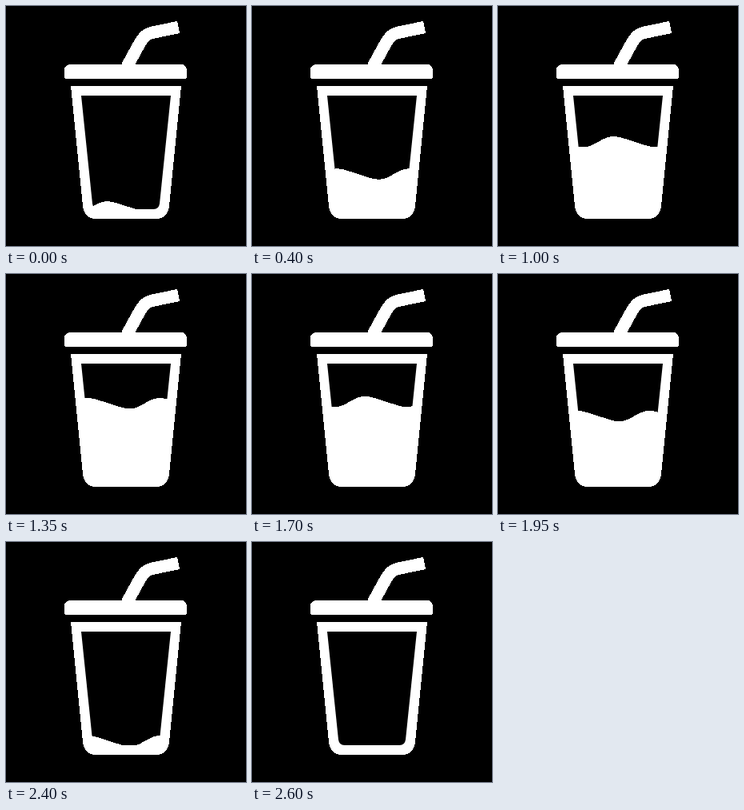
An HTML page that plays this animation: 300x300 px, repeating every 3250 ms.

```html
<!DOCTYPE html>
<html lang="en">
<head>
<meta charset="utf-8">
<title>Filling cup</title>
<style>
  html, body { margin: 0; height: 100%; overflow: hidden; background: #000; }
  svg { display: block; width: 100%; height: 100%; }
</style>
</head>
<body>
<svg viewBox="0 0 300 300" fill="#fff" shape-rendering="crispEdges">
  <clipPath id="inside">
    <path d="M94 112H206L192 247Q191 254 184.500 254H115.500Q109 254 108 247Z"/>
  </clipPath>
  <path d="M151 76L167.500 46Q173.500 35.500 182 33.400L215.600 26.500" fill="none" stroke="#fff" stroke-width="15.400"/>
  <path d="M73 81Q73 73 81 73H218Q226 73 226 81V88Q226 91 223 91H76Q73 91 73 88Z"/>
  <path d="M81 100H219L204 250Q202 266 187 266H113Q98 266 96 250Z"/>
  <path id="air" clip-path="url(#inside)" fill="#000"/>
</svg>
<script>
const LOOP = 3250, STEP = 50, PEAK = 1700, EMPTY = 2600;
const TOP = 159.5, WAVELENGTH = 90, AMPLITUDE = 6.4, SKEW = .14;
const air = document.getElementById('air');

// cubic-bezier(.25, .1, .25, 1)
function ease(x) {
  const curve = (s, a, b) => 3 * a * s * (1 - s) ** 2 + 3 * b * s * s * (1 - s) + s ** 3;
  let low = 0, high = 1;
  for (let i = 0; i < 24; i++) {
    const mid = (low + high) / 2;
    if (curve(mid, .25, .25) < x) low = mid; else high = mid;
  }
  return curve(low, .1, 1);
}

const easeInOut = x => (1 - Math.cos(Math.PI * x)) / 2;

function level(t) {
  if (t < PEAK) return TOP + 95 * (1 - ease((t + 100) / (PEAK + 100)));
  if (t < EMPTY) return TOP + 101 * easeInOut((t - PEAK) / (EMPTY - PEAK));
  return 300;
}

function draw(t) {
  const s = t / 1000, y = level(t);
  const drift = 130 - 36 * (s + s * s);
  let d = 'M90 100';
  for (let x = 90; x <= 210; x += 2) {
    const phase = 2 * Math.PI * (x - drift) / WAVELENGTH;
    // The second harmonic makes the left flank of each crest steeper.
    const wave = AMPLITUDE * (Math.cos(phase) - SKEW * Math.sin(2 * phase));
    d += `L${x} ${(y - wave).toFixed(2)}`;
  }
  air.setAttribute('d', d + 'V100Z');
}

const start = performance.now();
function tick() {
  const t = (performance.now() - start) % LOOP;
  draw(Math.floor(t / STEP) * STEP);
  requestAnimationFrame(tick);
}
tick();
</script>
</body>
</html>
```
